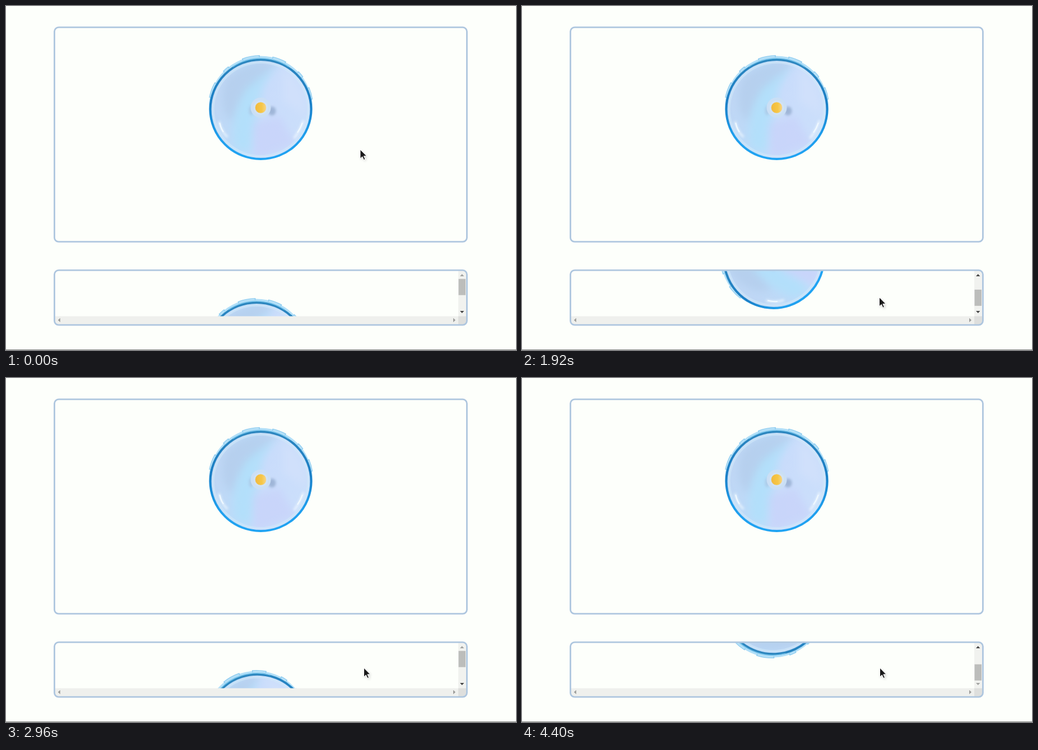
Write an HTML page that moves like this. It is 910 by 616 pixels and loops after 4.48 s.

```html
<!DOCTYPE html>
<html lang="en">
<head>
<meta charset="utf-8">
<title>Scrolling wheel</title>
<style>
html, body { margin: 0; width: 100%; height: 100%; overflow: hidden; background: #fdfffb; }
svg { display: block; }
</style>
</head>
<body>
<svg width="910" height="616" viewBox="0 0 910 616">
  <defs>
    <linearGradient id="rim" gradientUnits="userSpaceOnUse" x1="0" y1="-90" x2="0" y2="95">
      <stop offset="0" stop-color="#2d86bd"/>
      <stop offset=".45" stop-color="#1a7fc6"/>
      <stop offset=".75" stop-color="#1f9eec"/>
      <stop offset="1" stop-color="#20a4f3"/>
    </linearGradient>
    <linearGradient id="dish" gradientUnits="userSpaceOnUse" x1="-85" y1="-15" x2="85" y2="15">
      <stop offset="0" stop-color="#bfd6f4"/>
      <stop offset=".38" stop-color="#bcdcfa"/>
      <stop offset=".55" stop-color="#c9dcfb"/>
      <stop offset="1" stop-color="#cbdffb"/>
    </linearGradient>
    <linearGradient id="cap" x1="0" x2="1">
      <stop offset="0" stop-color="#f1b93f"/>
      <stop offset=".6" stop-color="#f6c746"/>
      <stop offset="1" stop-color="#f6d588"/>
    </linearGradient>
    <filter id="soft" x="-50%" y="-50%" width="200%" height="200%"><feGaussianBlur stdDeviation="7"/></filter>
    <filter id="haze" x="-50%" y="-50%" width="200%" height="200%"><feGaussianBlur stdDeviation="2"/></filter>
    <clipPath id="dishClip"><ellipse cy="3" rx="89" ry="88"/></clipPath>
    <clipPath id="pane"><path d="M88 474.5H807V556H88Z"/></clipPath>
    <clipPath id="frame"><rect x="87" y="473" width="735" height="98" rx="7"/></clipPath>

    <g id="wheel">
      <circle r="92.5" fill="#b1dff8"/>
      <g id="teeth" fill="none"></g>
      <ellipse cy="3" rx="90" ry="89" fill="url(#dish)"/>
      <g clip-path="url(#dishClip)">
        <g filter="url(#soft)">
          <path d="M-62-50Q-20-92 36-82L-18-34Q-44-8-52 26Q-78 0-62-50Z" fill="#b3cbea" opacity=".65"/>
          <path d="M34-82L2-36Q-14 20-18 82L-46 70Q-56 12-26-34Z" fill="#b1e0fb" opacity=".75"/>
          <path d="M-14 30L34 16L62 66L-10 92Z" fill="#c8d4fa" opacity=".8"/>
          <path d="M40-70Q82-44 78 12L40-12Z" fill="#d0e0fb"/>
        </g>
        <ellipse cy="3" rx="85" ry="84" fill="none" stroke="#d3e9fb" stroke-width="4" opacity=".6"/>
        <path d="M-74 26Q-70 43-60 52M76 24Q70 42 60 54" fill="none" stroke="#f2faff" stroke-width="3" stroke-linecap="round" filter="url(#haze)"/>
        <path d="M-73 28Q-71 37-67 43M74 28Q71 37 66 44" fill="none" stroke="#f2faff" stroke-width="2" stroke-linecap="round"/>
      </g>
      <ellipse cy="3" rx="90" ry="89" fill="none" stroke="url(#rim)" stroke-width="4"/>
      <path d="M-50-73A90 89 0 0 1 50-73" fill="none" stroke="#68bbe6" stroke-width="1.5"/>
      <ellipse cx="20" cy="6" rx="7" ry="8" fill="#92a9cc" opacity=".75" filter="url(#haze)"/>
      <ellipse cx="-17" cy="5" rx="4" ry="9" fill="#a8bfdd" opacity=".6" filter="url(#haze)"/>
      <circle r="18" fill="#cadff5"/>
      <circle r="13" fill="#d1e2f5"/>
      <circle r="9.8" fill="url(#cap)"/>
    </g>
  </defs>

  <rect width="910" height="616" fill="#fdfffb"/>
  <use href="#wheel" transform="translate(454.5 182)"/>
  <g clip-path="url(#pane)"><use id="roller" href="#wheel"/></g>

  <g clip-path="url(#frame)">
    <path d="M807 474H822V556H807Z" fill="#f1f2ef"/>
    <path d="M87 555.5H807V571H87Z" fill="#eff0ed"/>
    <path d="M807 555.5H822V571H807Z" fill="#dedfdd"/>
    <rect id="thumb" x="807.5" width="12.5" height="29" fill="#bcbdbb"/>
    <path id="up" d="M810 484L813.7 480L817.4 484Z"/>
    <path id="down" d="M810 546L813.7 550L817.4 546Z"/>
    <path d="M96.7 558.8L92.7 562.5L96.7 566.2ZM798 558.8L802 562.5L798 566.2Z" fill="#9b9c9a"/>
  </g>
  <g fill="none" stroke="#aec6df" stroke-width="2.8">
    <rect x="86.4" y="38.2" width="736" height="384" rx="7.5"/>
    <rect x="86.4" y="473.2" width="736" height="98" rx="7.5"/>
  </g>
  <path d="M0 615.5H910" stroke="#858684"/>

  <g id="cursor">
    <path d="M1 2V18L5 14.5L8 20.5L11 19L8.5 13.5H13Z" fill="#777" opacity=".35" filter="url(#haze)"/>
    <path d="M0 0V16.2L3.8 12.8L6.5 18.6L9 17.4L6.4 11.8H11.6Z" fill="#191919" stroke="#fff" stroke-width="1"/>
  </g>
</svg>
<script>
const LOOP = 4480, STEP = 80, SCROLL_MAX = 209;
const $ = id => document.getElementById(id);
const clamp = x => Math.min(1, Math.max(0, x));
const smooth = x => x * x * (3 - 2 * x);

// Keys are [ms, value]; values in between are linear.
function track(keys, t) {
  const i = keys.findIndex(k => k[0] > t);
  if (i === 0) return keys[0][1];
  if (i < 0) return keys[keys.length - 1][1];
  const [t0, a] = keys[i - 1], [t1, b] = keys[i];
  return a + (b - a) * (t - t0) / (t1 - t0);
}

const scrollKeys = [[1760, 0], [1960, SCROLL_MAX], [2520, SCROLL_MAX], [2920, 0], [3200, 0], [3600, 90], [4120, SCROLL_MAX]];
const angleKeys = [[1760, 0], [1960, -79], [2520, -79], [2920, -18], [3200, -18], [3600, -82], [4120, -161]];
const cursorYKeys = [[1760, 522], [2240, 521], [2480, 521], [2640, 519]];

function arc(radius, mid, half) {
  const point = deg => {
    const a = deg * Math.PI / 180;
    return `${radius * Math.cos(a)} ${radius * Math.sin(a)}`;
  };
  return `M${point(mid - half)}A${radius} ${radius} 0 0 1 ${point(mid + half)}`;
}

// Grip teeth on the rim: [angle, half width].
const teeth = [[-160, 9], [-132, 4], [-101, 10], [-69, 8], [-40, 4], [-16, 7]];
$('teeth').innerHTML = teeth.map(([mid, half]) =>
  `<path d="${arc(92, mid, half)}" stroke="#8fcdf0" stroke-width="4"/>` +
  `<path d="${arc(91.5, mid, half - 1)}" stroke="#b9e2f8" stroke-width="2.4"/>`).join('');

function draw(t) {
  const scroll = track(scrollKeys, t);
  $('roller').setAttribute('transform', `translate(447 ${617 - scroll}) rotate(${track(angleKeys, t)})`);
  $('thumb').setAttribute('y', 488.7 + 24 * scroll / SCROLL_MAX);
  $('up').setAttribute('fill', scroll > 0 ? '#454545' : '#a2a3a1');
  $('down').setAttribute('fill', scroll < SCROLL_MAX ? '#454545' : '#a2a3a1');

  const p = smooth(clamp((t - 815) / 640));
  const x = 632 + 5.5 * p + 8.5 * Math.sin(Math.PI * p) + clamp((t - 2480) / 160);
  const y = t < 1760 ? 257 + 265 * p : track(cursorYKeys, t);
  $('cursor').setAttribute('transform', `translate(${x} ${y})`);
}

const start = performance.now();
function tick() {
  const t = (performance.now() - start) % LOOP;
  draw(Math.floor(t / STEP) * STEP);
  requestAnimationFrame(tick);
}
tick();
</script>
</body>
</html>
```
